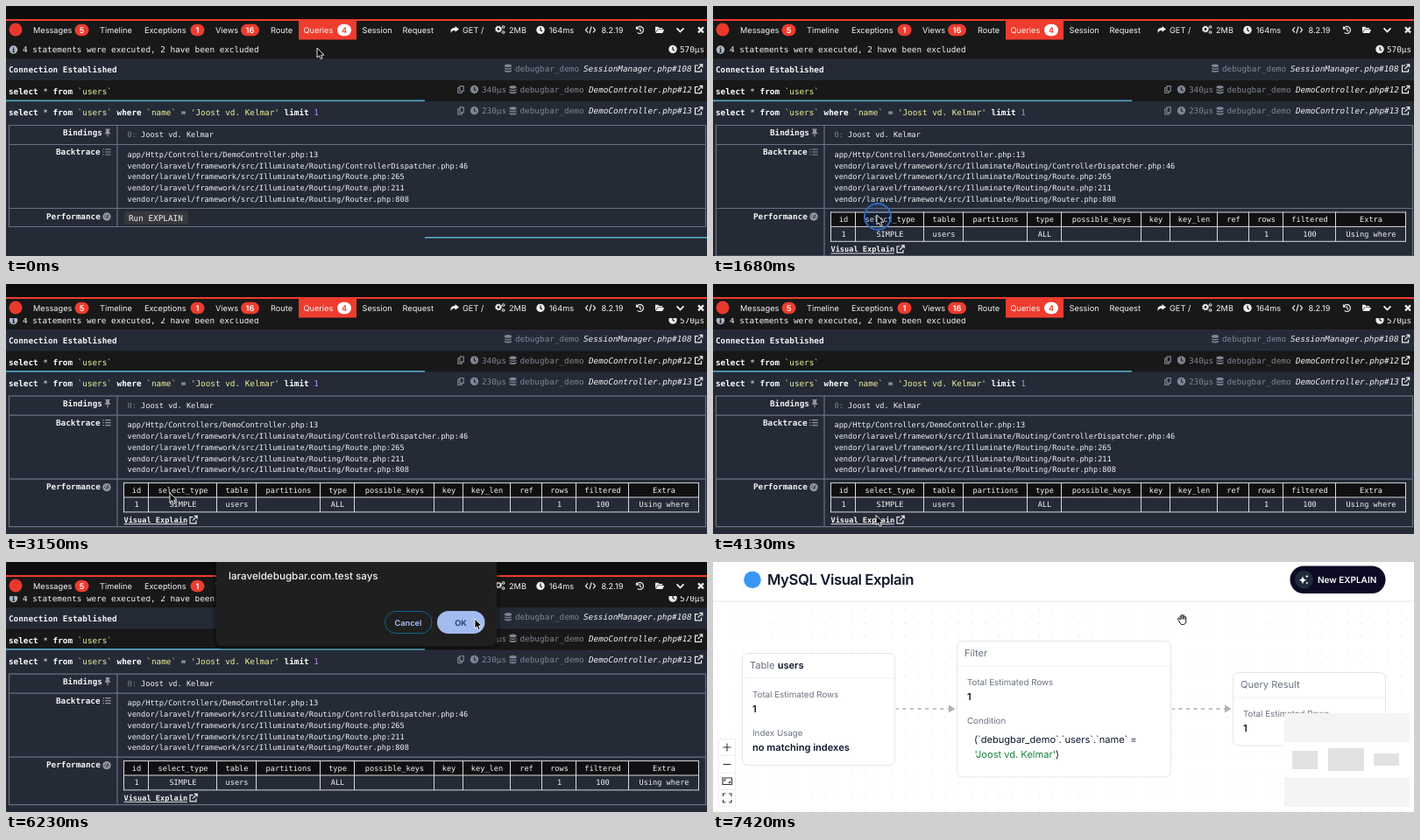
An HTML page that plays this animation: 800x286 px, repeating every 7490 ms.

```html
<!DOCTYPE html>
<html lang="en">
<head>
<meta charset="utf-8">
<title>Query explain</title>
<style>
html, body { margin: 0; width: 100%; height: 100%; overflow: hidden; background: #111; }
svg { display: block; width: 100%; height: 100%; }
text { white-space: pre; text-rendering: geometricPrecision; fill: #f4f4f4; font-family: Inter, sans-serif; }
.mono { font: 9.33px 'DejaVu Sans Mono', monospace; }
.code { font: 8.62px 'DejaVu Sans Mono', monospace; }
.tab { font-size: 9.2px; }
.bold { font-weight: 700; }
.semi { font-weight: 600; }
.ital { font-style: italic; }
.mid { text-anchor: middle; }
.node { font-size: 11.1px; }
.label { font-size: 9.75px; }
</style>
</head>
<body>
<svg id="stage" viewBox="0 0 800 286" preserveAspectRatio="none"></svg>
<script>
const LOOP = 7490, STEP = 70;
const RED = '#ee3c2e', NAVY = '#252a37', DARK = '#181818', DIM = '#7f8593', LINE = '#697083', GREY = '#6b7280', INK = '#0f172a';
const PERSON = 'Joost vd. Kelmar';

const text = (x, y, s, cls, fill = '') =>
  `<text x="${x}" y="${y}" class="${cls}"${fill && ` style="fill:${fill}"`}>${s}</text>`;
const span = (s, fill, cls = '') => `<tspan class="${cls}" style="fill:${fill}">${s}</tspan>`;
const rect = (x, y, w, h, fill, r = 0, more = '') =>
  `<rect x="${x}" y="${y}" width="${w}" height="${h}" rx="${r}" fill="${fill}" ${more}/>`;
const stroke = (d, color, w = 1, more = '') =>
  `<path d="${d}" fill="none" stroke="${color}" stroke-width="${w}" ${more}/>`;
const group = (id, body) => `<g id="${id}">${body}</g>`;

// Each icon is centred on 0,0: filled shape, lines, and whether the lines are cut out of the fill.
const ICONS = {
  clock: ['M-4.7 0a4.7 4.7 0 1 0 9.4 0a4.7 4.7 0 1 0-9.4 0', 'M0-2.8V.2L1.9 1.5', 1],
  info: ['M-4.7 0a4.7 4.7 0 1 0 9.4 0a4.7 4.7 0 1 0-9.4 0', 'M0-2.8v1.2M-.9-.5H.2V2.5M-1.2 2.5H1.3', 1],
  gauge: ['M-4.7 0a4.7 4.7 0 1 0 9.4 0a4.7 4.7 0 1 0-9.4 0', 'M-.5 2L1.8-2M-2.9 0h.9M-1.5-2.2l.5.6M2.4.8h.6', 1],
  db: ['M-4-3a4 1.6 0 0 1 8 0v6.2a4 1.6 0 0 1-8 0z', 'M-4-1.7a4 1.5 0 0 0 8 0M-4 1a4 1.5 0 0 0 8 0', 1],
  ext: ['', 'M-.6-3H-4V4.2H3V1M.8-4.2H4.2V-.8M4-4L-1 1'],
  copy: ['', 'M-1-3.9H3.2V2H-1ZM-1.3-2H-3.2V4H1.2V2.3'],
  share: ['M.5-4L5-.6L.5 2.8V.9C-2 .9-3.5 1.6-4.2 4C-5.4 0-3.4-2.1 .5-2.1Z', ''],
  tags: ['', 'M-3-3L-5.5 0L-3 3M3-3L5.5 0L3 3M1.1-4L-1.1 4'],
  history: ['', 'M-4-4V-1.3H-1.3M-3.7-1.6A4 4 0 1 1-2.8 3M0-2.2V.3L1.6 1.5'],
  folder: ['M-5-3.6H-1.8L-.6-2.4H3.2V-1H-2.6L-5 3ZM-2.2-.3H5.3L3.2 3.7H-4.6Z', ''],
  down: ['', 'M-4-2L0 2L4-2'],
  close: ['', 'M-3-3L3 3M3-3L-3 3'],
  pin: ['M-2.6-4.5H2.6V-3.3H1.7L2 -1L3.6 1.2H.6V4.6H-.6V1.2H-3.6L-2-1L-1.7-3.3H-2.6Z', ''],
  list: ['', 'M-4.6-3H-3.2M-4.6 0H-3.2M-4.6 3H-3.2M-1.8-3H4.6M-1.8 0H4.6M-1.8 3H4.6']
};
const icon = (name, x, y, color = '#eee', back = DARK, w = 1.2) => {
  const [fill, lines, cut] = ICONS[name];
  return `<g transform="translate(${x} ${y})"><path d="${fill}" fill="${color}"/>${stroke(lines, cut ? back : color, w)}</g>`;
};
const cog = (x, y, r) => `<circle cx="${x}" cy="${y}" r="${r}" fill="none" stroke="#eee" stroke-width="${r * .75}"/>` +
  `<circle cx="${x}" cy="${y}" r="${r * 1.5}" fill="none" stroke="#eee" stroke-width="${r * .45}" stroke-dasharray="${r * .59}"/>`;

function toolbar() {
  const tabs = [[31, 'Messages'], [107, 'Timeline'], [158, 'Exceptions'], [239, 'Views'], [302, 'Route'], [339.5, 'Queries'],
    [406.5, 'Session'], [452.5, 'Request'], [521, 'GET /'], [574, '2MB'], [619.8, '164ms'], [679.5, '8.2.19']];
  const badges = [[78.5, 16, 5], [210.5, 16, 1], [268, 21, 16], [378, 16, 4]];
  return rect(0, 0, 800, 15, '#0d0d0e') + rect(0, 17, 800, 22, DARK) + rect(0, 15, 800, 2, RED) + rect(334, 16, 66, 22.5, RED) +
    '<circle cx="11" cy="27" r="7.5" fill="#e8392c"/>' +
    tabs.map(([x, s]) => text(x, 31, s, 'tab')).join('') +
    badges.map(([x, w, n]) => rect(x, 20.8, w, 13.4, n === 4 ? '#fff' : RED, 6.7) +
      text(x + w / 2, 30.6, n, 'tab mid semi', n === 4 ? RED : '#fff')).join('') +
    icon('share', 512, 27) + cog(562, 26.5, 2.3) + cog(567.6, 24, 1.2) + cog(567.6, 30, 1.2) +
    icon('clock', 610, 27.4) + icon('tags', 667, 27.4) + icon('history', 723.5, 27.4) +
    icon('folder', 746, 27.4) + icon('down', 769.5, 27.4, '#eee', DARK, 1.8) + icon('close', 793, 27.4, '#eee', DARK, 2.2);
}

function queryMeta(y, dbX, file, fileX, time, back) {
  const timing = time ? icon('copy', 519, y - 3.5, DIM, back) + icon('clock', 534.5, y - 3.5, DIM, back) + text(543, y, time, 'mono', DIM) : '';
  return timing + icon('db', dbX, y - 3.5, DIM, back) + text(dbX + 8, y, 'debugbar_demo', 'mono', DIM) +
    text(fileX, y, file, 'mono ital') + icon('ext', 790.5, y - 3.5);
}

function panel(bottom) {
  return stroke(`M3.5 136.5H798.5V${bottom}H3.5ZM127 136.5V${bottom}M3.5 158.5H798.5M3.5 231.5H798.5`, LINE, 1.2);
}

function resultTable() {
  const edges = [135, 163, 241, 286, 359, 398, 489, 522, 576, 612, 651, 711, 791];
  const heads = 'id,select_type,table,partitions,type,possible_keys,key,key_len,ref,rows,filtered,Extra'.split(',');
  const cells = '1,SIMPLE,users,,ALL,,,,,1,100,Using where'.split(',');
  const row = (names, y) => names.map((s, i) => text((edges[i] + edges[i + 1]) / 2, y, s, 'code mid')).join('');
  return rect(135, 236, 656, 16.5, '#101012') +
    stroke(edges.map(x => `M${x - .5} 235.5V269.5`).join('') + 'M134 236H791M134 252.4H791M134 269.3H791', '#d8d9dc', 1) +
    row(heads, 247) + row(cells, 263.6) +
    text(134.5, 281.3, 'Visual Explain', 'code bold') + stroke('M134.5 283H207', '#f4f4f4', .9) + icon('ext', 214, 278);
}

function queries() {
  const yellow = '#eef29a';
  const select = `${span('select', '#fff', 'bold')} * ${span('from', '#fff', 'bold')} ${span('`users`', yellow)}`;
  const where = ` ${span('where', '#fff', 'bold')} ${span('`name`', yellow)} = ${span(`'${PERSON}'`, yellow)} ${span('limit', '#fff', 'bold')} ${span('1', '#b58cf0')}`;
  const routing = 'vendor/laravel/framework/src/Illuminate/Routing/';
  const trace = ['app/Http/Controllers/DemoController.php:13', routing + 'ControllerDispatcher.php:46',
    routing + 'Route.php:265', routing + 'Route.php:211', routing + 'Router.php:808'];
  return rect(0, 30, 800, 30.5, DARK) + rect(0, 60.5, 800, 250, NAVY) + rect(0, 85, 800, 24, DARK) +
    icon('info', 8.5, 50, '#a9b6c9') + text(19, 53, '4 statements were executed, 2 have been excluded', 'mono') +
    icon('clock', 761, 49.5) + text(769, 53, '570µs', 'mono') +
    text(3, 76.3, 'Connection Established', 'mono bold') + queryMeta(74.5, 573, 'SessionManager.php#108', 659, '', NAVY) +
    text(3, 101, select, 'mono') + queryMeta(99, 578.5, 'DemoController.php#12', 665, '340µs', DARK) +
    rect(0, 107.4, 478, 1.8, '#519fb6') +
    text(3, 125, select + where, 'mono') + queryMeta(123.3, 578.5, 'DemoController.php#13', 665, '230µs', NAVY) +
    text(65, 148.3, 'Bindings', 'mono bold') + icon('pin', 116, 145, '#92969f') +
    text(138.5, 150.3, span('0:', DIM) + ' ' + PERSON, 'code') +
    text(57, 170.3, 'Backtrace', 'mono bold') + icon('list', 115, 167, '#92969f') +
    trace.map((s, i) => text(138.5, 172.8 + i * 12.75, s, 'code')).join('') +
    text(46, 243.8, 'Performance', 'mono bold') + icon('gauge', 115, 241, '#92969f', NAVY) +
    group('before', panel(252.5) + rect(135, 235, 73, 15, '#37383c', 3, 'id="run"') +
      text(140, 245.8, 'Run EXPLAIN', 'mono') + rect(478, 264, 322, 1.8, '#519fb6')) +
    group('after', panel(286) + resultTable());
}

function dialog() {
  return rect(236, -10, 328, 110, '#000', 10, 'opacity=".25"') + rect(240, -10, 320, 106, '#1f1f1f', 7) +
    text(254, 20.2, 'laraveldebugbar.com.test says', '" font-size="11.65" font-weight="500') +
    rect(432.5, 56.5, 53.5, 25, 'none', 12.5, 'stroke="#10658f"') + text(459, 72.8, 'Cancel', 'mid semi tab', '#a8c7fa') +
    rect(492, 56, 54.5, 26, '#a8c7fa', 13, 'id="ok"') + text(519, 72.8, 'OK', 'mid semi tab', '#17386f');
}

function card(x, y, w, h, title) {
  return rect(x + .5, y + .5, w, h, '#fff', 6, 'stroke="#e4e5e9"') + stroke(`M${x + 1} ${y + 29}H${x + w}`, '#eceef1') +
    text(x + 9, y + 18.3, title, 'node', GREY) +
    text(x + 12, y + 51, 'Total Estimated Rows', 'label', GREY) + text(x + 12, y + 68, '1', 'node semi', INK);
}

function edge(x, y) {
  return stroke(`M${x} ${y}H${x + 62}`, '#b1b1b7', 1.3, 'class="flow" stroke-dasharray="4.3"') +
    `<path d="M${x + 60} ${y - 4.5}L${x + 67.5} ${y}L${x + 60} ${y + 4.5}Z" fill="#b1b1b7"/>`;
}

function diagram() {
  const buttons = ['M11.5 212H20.5M16 207.5V216.5', 'M11.5 231.5H20.5', 'M11 247H21.5V254.5H11ZM13 251V249H15M19.5 250.5V252.5H17.5',
    'M11.5 268V265H14.5M18 265H21V268M21 272V275H18M14.5 275H11.5V272'];
  return rect(0, 46, 800, 240, 'url(#dots)') +
    group('flow', edge(209, 168) + edge(524, 168) +
      card(33, 104, 174, 128, `Table ${span('users', INK, 'semi')}`) +
      text(45, 198.6, 'Index Usage', 'label', GREY) + text(45, 216, 'no matching indexes', 'node semi', INK) +
      card(278, 90, 244, 155.5, 'Filter') + text(290, 184.7, 'Condition', 'label', GREY) +
      text(298, 207, '(`debugbar_demo`.`users`.`name` =', 'node', INK) +
      text(298.5, 224, span(`'${PERSON}'`, '#15803d') + ')', 'node', INK) +
      card(593, 126, 174, 83.5, 'Query Result') +
      rect(652, 173, 143, 107, '#f4f4f4') + rect(652, 206, 143, 40.5, '#fff') +
      rect(661, 216, 29, 21, '#e2e2e2') + rect(702, 213, 41, 26, '#e2e2e2') + rect(754, 219, 29, 14, '#e2e2e2')) +
    rect(6.5, 202.5, 19, 77, '#fff', 0, 'stroke="#eee"') + stroke('M7 221.5H25M7 241H25M7 260.5H25', '#eee') +
    buttons.map(d => stroke(d, '#333', 1.1)).join('');
}

function explainPage() {
  return rect(0, 0, 800, 286, '#fff') + group('diagram', diagram()) + rect(0, 0, 800, 45, '#fff') + stroke('M0 45H800', '#e3e5ea') +
    '<circle cx="45" cy="20.3" r="9.8" fill="#3b97f6"/>' +
    text(62, 26.3, 'MySQL Visual Explain', 'semi" font-size="16.7" letter-spacing="-.42', INK) +
    rect(658.5, 4.5, 109, 31.5, '#0c0a24', 15.7) + '<circle cx="674.5" cy="20.2" r="10.5" fill="#1d2b3a"/>' +
    '<path d="M673 16Q673.6 20 677.4 20.8Q673.6 21.6 673 25.5Q672.4 21.6 668.6 20.8Q672.4 20 673 16Z" fill="#fff"/>' +
    stroke('M677.8 14.8V18M676.2 16.4H679.4M677.8 22.8V25.2M676.6 24H679', '#fff', .8) +
    text(690, 23.9, 'New EXPLAIN', 'semi" font-size="10', '#fff');
}

const stage = document.getElementById('stage');
stage.innerHTML = `<defs><clipPath id="view"><rect y="38.5" width="800" height="248"/></clipPath>
  <pattern id="dots" width="15.3" height="15.3" patternUnits="userSpaceOnUse"><circle cx="5" cy="9" r=".65" fill="#d9dade"/></pattern></defs>` +
  group('debugbar', rect(0, 0, 800, 286, NAVY) + `<g clip-path="url(#view)">${group('scroller', queries())}</g>` + toolbar()) +
  group('dialog', dialog()) +
  group('blank', rect(0, 0, 800, 286, '#3a3a3a') + rect(0, 281, 800, 5, '#3e373a')) +
  group('explain', explainPage()) +
  '<circle id="ring" fill="#2d64c8" fill-opacity=".16" stroke="#3468bd" stroke-width="2"/>' +
  '<path id="arrow" d="M0 0V11L2.5 8.8L4.2 12.5L6.1 11.7L4.5 8.1H7.9Z" fill="#000" stroke="#fff" stroke-width=".9"/>' +
  '<path id="hand" transform="translate(535.5 66)" fill="#fff" stroke="#111" d="M-3.5 1.8L-5-.4c-.6-1 .6-1.8 1.4-1L-2.5 0V-3.6c0-1.3 1.6-1.3 1.7 0V-4.8c0-1.3 1.7-1.3 1.7 0v.6c.1-1.1 1.7-1.1 1.7.1V-2.8c.2-1 1.7-.9 1.7.2V1.5C4.3 4 3 5.5 1 5.5H-.5C-2 5.5-2.5 3.5-3.5 1.8ZM-.8-3.6V-.5M.9-4.2V-.5M2.6-2.8V-.3"/>';

const $ = id => document.getElementById(id);
const show = (id, on) => { $(id).style.display = on ? '' : 'none'; };
const progress = (t, from, to) => Math.min(1, Math.max(0, (t - from) / (to - from)));
const smooth = p => p * p * (3 - 2 * p);

const MOVES = [[0, 770, 187, 239], [3500, 4270, 186, 267], [4970, 5740, 535, 65]];
const CLICKS = [1470, 4410, 6300];
const RING_LIFE = 350;
const SCROLL = 8.4;

function pointer(t) {
  let x = 355, y = 48;
  for (const [from, to, endX, endY] of MOVES) {
    const p = smooth(progress(t, from, to));
    x += (endX - x) * p;
    y += (endY - y) * p;
  }
  return [x, y];
}

function render(t) {
  const [x, y] = pointer(t);
  $('arrow').setAttribute('transform', `translate(${x} ${y})`);
  show('arrow', t < 6860);
  show('hand', t >= 6860);

  const click = CLICKS.find(c => t >= c && t < c + RING_LIFE);
  const age = (t - click) / RING_LIFE;
  show('ring', click !== undefined && t < 6510);
  if (click !== undefined) {
    const ring = $('ring');
    ring.setAttribute('cx', x + 1);
    ring.setAttribute('cy', y + 2);
    ring.setAttribute('r', 5 + 10 * Math.min(1, age / .6));
    ring.setAttribute('opacity', 1 - progress(age, .6, 1));
  }

  show('before', t < 1610);
  show('after', t >= 1610);
  $('run').setAttribute('fill', t >= 770 ? '#45464b' : '#37383c');
  const scroll = SCROLL * smooth(progress(t, 2800, 3150));
  $('scroller').setAttribute('transform', `translate(0 ${-scroll})`);

  show('dialog', t >= 4550 && t < 6440);
  $('dialog').setAttribute('opacity', progress(t, 4480, 4690));
  $('ok').setAttribute('fill', t >= 5670 ? '#a3bbef' : '#a8c7fa');

  show('debugbar', t < 6510);
  show('blank', t >= 6510 && t < 6720);
  show('explain', t >= 6720);
  show('diagram', t >= 6790);
  show('flow', t >= 6860);
  for (const line of document.querySelectorAll('.flow')) line.setAttribute('stroke-dashoffset', -t / 500 * 8.6);
}

const start = performance.now();
function tick() {
  const t = (performance.now() - start) % LOOP;
  render(Math.floor(t / STEP) * STEP);
  requestAnimationFrame(tick);
}
tick();
</script>
</body>
</html>
```
